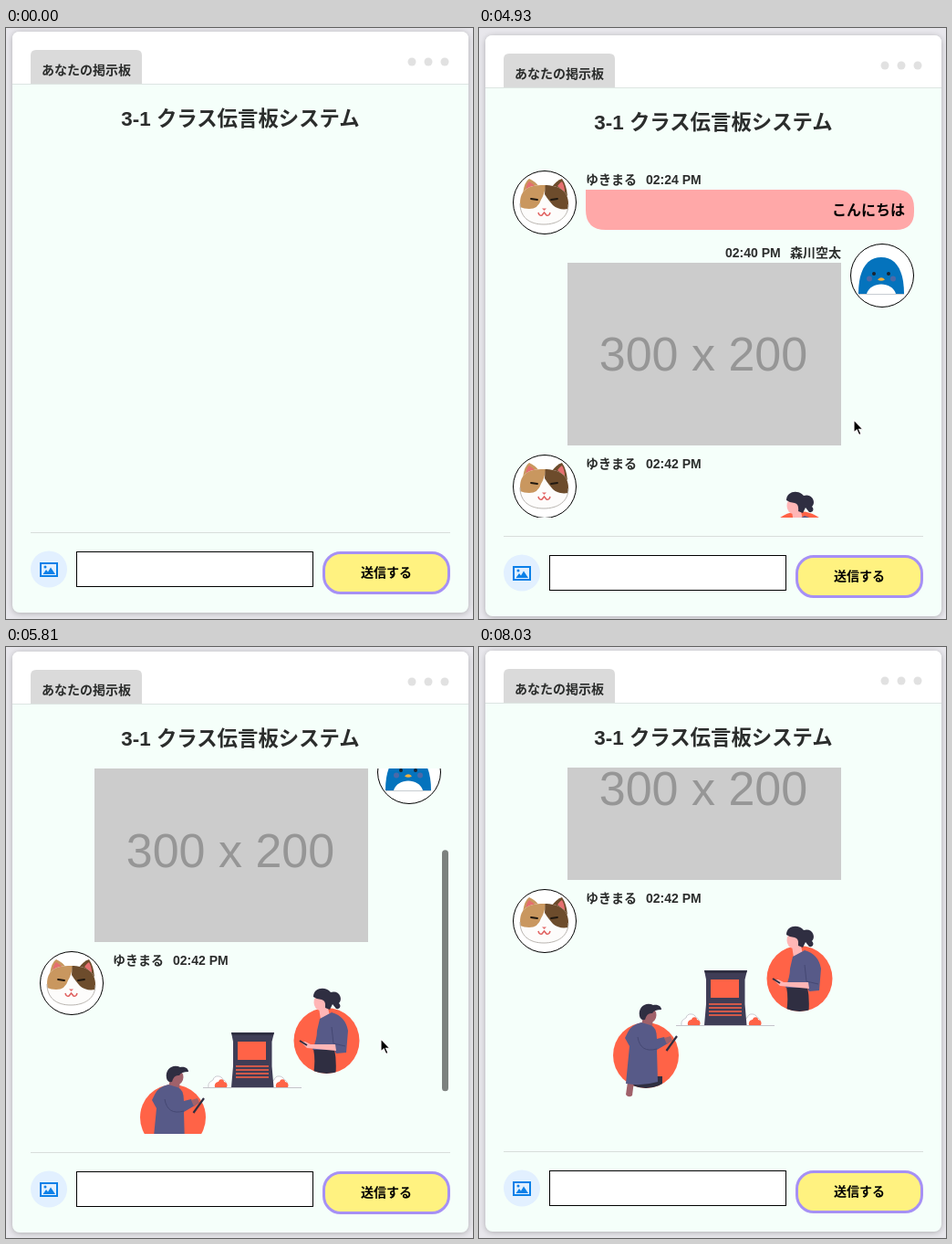
Write an HTML page that moves like this. It is 512 px wide and 647 px high and loops after 8.96 s.

```html
<!DOCTYPE html>
<html lang="ja">
<head>
<meta charset="utf-8">
<title>伝言板</title>
<style>
html, body { margin: 0; width: 100%; height: 100%; overflow: hidden; background: #e8e7ec; }
svg { display: block; }
text { font: bold 14px "Liberation Sans", "Noto Sans CJK JP", "Noto Sans CJK", sans-serif; fill: #2b2d2c; }
.title { font-size: 22.4px; text-anchor: middle; }
.hello { font-size: 16px; text-anchor: end; fill: #000; }
.size { font-size: 52px; font-weight: normal; text-anchor: middle; fill: #969696; }
.send { text-anchor: middle; fill: #000; }
.panel { filter: drop-shadow(0 1px 3px rgba(0, 0, 0, .25)); }
</style>
</head>
<body>
<svg width="512" height="647" viewBox="0 0 512 647">
  <defs>
    <clipPath id="view"><rect x="27" y="132" width="460" height="400"/></clipPath>
    <clipPath id="rightDisc"><circle cx="351.5" cy="98" r="36"/></clipPath>
    <clipPath id="leftDisc"><circle cx="183" cy="182" r="36"/></clipPath>
    <clipPath id="face"><path d="M8 36C8 21 17 16 34 16S61 22 61 37C61 51 51 59 34 59S8 51 8 36Z"/></clipPath>

    <g id="cat">
      <circle cx="35" cy="35" r="34.5" fill="#fff" stroke="#000"/>
      <path d="M11 25Q13 12 18 9Q25 12 29 18Z" fill="#c9975f"/>
      <path d="M14 23Q15 14 18 12Q23 15 26 19Z" fill="#e56f70"/>
      <path d="M43 18Q48 11 54 9Q59 16 60 28Z" fill="#6d4c2c"/>
      <path d="M49 17Q52 13 54 12Q57 17 57 24Z" fill="#e56f70"/>
      <g clip-path="url(#face)">
        <rect width="70" height="70" fill="#fdfcfb"/>
        <path d="M5 10H37Q36 24 31 32Q28 42 18 42Q11 42 6 39Z" fill="#c9975f"/>
        <path d="M36 10H65V41Q52 45 44 38Q38 31 35 26Z" fill="#6d4c2c"/>
      </g>
      <path d="M8 36C8 51 18 59 34 59S61 51 61 37" fill="none" stroke="#b9b5b0"/>
      <path d="M20 31L27 32M42 32L49 31" stroke="#201810" stroke-width="1.8" stroke-linecap="round"/>
      <path d="M32 41.5H37L34.500 44Z" fill="#e56f70"/>
      <path d="M28 46Q29 50 32 49L34.500 46L37 49Q40 50 41 46" fill="none" stroke="#e0605f" stroke-width="1.5"/>
    </g>

    <g id="penguin">
      <circle cx="35" cy="35" r="34.5" fill="#fff" stroke="#000"/>
      <path d="M9 55C9 29 18 15 34 15S59 29 59 55Z" fill="#0473bd"/>
      <path d="M18 55C22 41 46 41 50 55Z" fill="#fff"/>
      <path d="M9 55.500H59" stroke="#c8cdd2"/>
      <circle cx="26" cy="33" r="2" fill="#1b2430"/><circle cx="42" cy="33" r="2" fill="#1b2430"/>
      <circle cx="21" cy="38.500" r="3" fill="#4c69a8"/><circle cx="47" cy="38.500" r="3" fill="#4c69a8"/>
      <path d="M30 39.500Q34 35 38 39.500Q34 42 30 39.500Z" fill="#f4b13d"/>
    </g>

    <g id="bush">
      <path d="M-13 0C-14 -6 -9 -7 -8 -8C-7 -14 2 -13 3 -8C6 -8 7 -4 6 0" fill="#fff" stroke="#c9c9cf"/>
      <path d="M-6 0C-7 -4 -4 -6 -2 -6C-1 -10 4 -9 4 -6C8 -5 8 -2 7 0Z" fill="#ff6347"/>
    </g>
  </defs>

  <g id="page">
    <g class="panel"><rect x="7" y="4" width="500" height="636" rx="8" fill="#f5fffa"/></g>
    <path d="M7 61V12Q7 4 15 4H499Q507 4 507 12V61Z" fill="#fff"/>
    <path d="M7 61.500H507" stroke="#dde5e2"/>
    <path d="M27 61V30Q27 24 33 24H143Q149 24 149 30V61Z" fill="#dadada"/>
    <text x="39" y="50.500">あなたの掲示板</text>
    <g fill="#e1e1e1">
      <circle cx="445" cy="37" r="4.500"/><circle cx="463" cy="37" r="4.500"/><circle cx="481" cy="37" r="4.500"/>
    </g>
    <text class="title" x="257" y="106.500">3-1 クラス伝言板システム</text>

    <g clip-path="url(#view)">
      <g id="list">
        <g id="greeting">
          <use href="#cat" x="37"/>
          <text x="117" y="14.500">ゆきまる</text><text x="183" y="14.500">02:24 PM</text>
          <path d="M117 21H457Q477 21 477 41V45Q477 65 457 65H139Q117 65 117 43Z" fill="#ffa8a8"/>
          <text class="hello" x="467" y="48.500">こんにちは</text>
        </g>
        <g id="picture">
          <use href="#penguin" x="407"/>
          <text x="270" y="14.500">02:40 PM</text><text x="341" y="14.500">森川空太</text>
          <rect x="97" y="21" width="300" height="200" fill="#ccc"/>
          <text class="size" x="246" y="138.500">300 x 200</text>
        </g>
        <g id="drawing">
          <use href="#cat" x="37"/>
          <text x="117" y="14.500">ゆきまる</text><text x="183" y="14.500">02:42 PM</text>

          <path d="M216 149.500H324" stroke="#c4c4ca"/>
          <use href="#bush" x="235" y="149"/><use href="#bush" x="302" y="149"/>
          <path d="M247 89H294L291.500 99V126L293.500 149H247L249 126V99Z" fill="#3f3d56"/>
          <path d="M247 89H294L293 92H248Z" fill="#2f2e41"/>
          <rect x="254" y="99" width="31" height="20" fill="#ff6347"/>
          <path d="M252 126H288M252 130H288M252 134H288M252 138H288" stroke="#ff6347" stroke-width="1.400"/>

          <circle cx="351.500" cy="98" r="36" fill="#ff6347"/>
          <path d="M337 107H360Q363 121 361 140H336Q340 122 337 107Z" fill="#2f2e41" clip-path="url(#rightDisc)"/>
          <path d="M343 62L352 58L355 71L345 75Z" fill="#ffb6b6"/>
          <ellipse cx="344.500" cy="56" rx="7" ry="9" fill="#ffb6b6"/>
          <path d="M337 50C337 40 350 38 356 45C365 42 370 52 365 57C368 60 366 64 362 63L358 58L355 64L350 62Q351 54 346 53Q341 53 337 50Z" fill="#2f2e41"/>
          <path d="M344 74L357 67Q372 71 375 87L373 111L362 112L360 108H336Q341 96 341 87Z" fill="#575a88"/>
          <path d="M362 109L330 106L323 99L328 99L334 102L361 102Z" fill="#ffb6b6"/>
          <path d="M357 83L359 101L372 104" fill="none" stroke="#454873"/>
          <path d="M322 98L330 103" stroke="#2f2e41" stroke-width="2"/>

          <circle cx="183" cy="182" r="36" fill="#ff6347"/>
          <path d="M166 205H201V219H166Z" fill="#2f2e41" clip-path="url(#leftDisc)"/>
          <path d="M163 211L170 210L168 226Q164 229 161 225Z" fill="#a0616a"/>
          <path d="M180 138H191L190 151H178Z" fill="#a0616a"/>
          <ellipse cx="187" cy="138" rx="7.500" ry="8.500" fill="#a0616a"/>
          <path d="M176 139C174 128 184 123 191 127C197 126 200 129 200 132Q192 132 190 136Q184 135 182 143Q177 144 176 139Z" fill="#2f2e41"/>
          <path d="M178 146Q166 149 163 157L160 163L165 172L161 213Q179 216 196 211L195 176L207 169L203 162L195 164Q195 151 188 149Z" fill="#575a88"/>
          <path d="M174 162Q177 180 195 175" fill="none" stroke="#454873"/>
          <path d="M203 163L210 161L212 166L206 170Z" fill="#a0616a"/>
          <path d="M205.500 177L217 161" stroke="#2f2e41" stroke-width="2.200"/>
        </g>
      </g>
      <rect id="bar" x="478" width="7" height="264" rx="3.500" fill="#7d817f"/>
    </g>

    <path d="M27 552.500H487" stroke="#d8dedb"/>
    <circle cx="47" cy="592.500" r="20" fill="#e2f0ff"/>
    <rect x="38" y="586" width="18" height="14" fill="none" stroke="#0b80e8" stroke-width="2"/>
    <path d="M40.500 598L44 593L46 595.500L49 590.500L54 598Z" fill="#0b80e8"/>
    <circle cx="43" cy="590" r="1.500" fill="#0b80e8"/>
    <rect x="77.500" y="573.500" width="259" height="38" fill="#fff" stroke="#000"/>
    <rect x="348.500" y="574.500" width="137" height="44" rx="18.500" fill="#fff280" stroke="#a690f5" stroke-width="3"/>
    <text class="send" x="417" y="600.500">送信する</text>
  </g>

  <path id="cursor" d="M1 1V15L4.200 12L6.600 17.500L9 16.500L6.600 11.300H11Z" fill="#000" stroke="#fff" stroke-width="1.100"/>
</svg>
<script>
const LOOP = 8960;
const VIEW_TOP = 132, PADDING = 20, BAR_RATIO = 2 / 3;

// Each step keeps whatever it does not change.
const steps = [
  [0, { messages: 0, page: 0, scroll: 0, bar: 0, cursor: null }],
  [3750, { messages: 2 }],
  [3900, { messages: 3 }],
  [4190, { cursor: [475, 447] }],
  [4340, { cursor: [410, 429] }],
  [4490, { cursor: [410, 428] }],
  [4780, { page: 2 }],
  [4930, { page: 4 }],
  [5080, { page: 5 }],
  [5220, { page: 4 }],
  [5370, { page: 1 }],
  [5510, { scroll: 45, bar: 1 }],
  [5660, { scroll: 93 }],
  [5810, { scroll: 131 }],
  [5960, { scroll: 159 }],
  [6100, { scroll: 179 }],
  [6250, { scroll: 188 }],
  [6400, { scroll: 194, page: 0 }],
  [6540, { scroll: 198 }],
  [7140, { bar: 0.5, cursor: [409, 429] }],
  [7290, { bar: 0, cursor: [395, 455] }],
  [7440, { cursor: [391, 458] }],
  [7580, { cursor: [391, 459] }],
  [7730, { cursor: [473, 627] }],
  [8030, { cursor: null }]
];

const get = id => document.getElementById(id);
const move = (id, x, y) => get(id).setAttribute("transform", `translate(${x} ${y})`);
const show = (id, on) => get(id).setAttribute("visibility", on ? "visible" : "hidden");

function stateAt(time) {
  const state = {};
  for (const [start, change] of steps) {
    if (start <= time) Object.assign(state, change);
  }
  return state;
}

function draw({ messages, page, scroll, bar, cursor }) {
  const first = messages === 3 ? 80 : 0;
  move("page", 0, page);
  move("list", 0, VIEW_TOP + PADDING - scroll);
  move("picture", 0, first);
  move("drawing", 0, first + 231);
  show("greeting", messages === 3);
  show("picture", messages > 0);
  show("drawing", messages > 0);
  get("bar").setAttribute("y", VIEW_TOP + 2 + scroll * BAR_RATIO);
  get("bar").setAttribute("opacity", bar);
  show("cursor", cursor);
  if (cursor) move("cursor", ...cursor);
}

const origin = performance.now();
function tick() {
  draw(stateAt((performance.now() - origin) % LOOP));
  requestAnimationFrame(tick);
}
tick();
</script>
</body>
</html>
```
